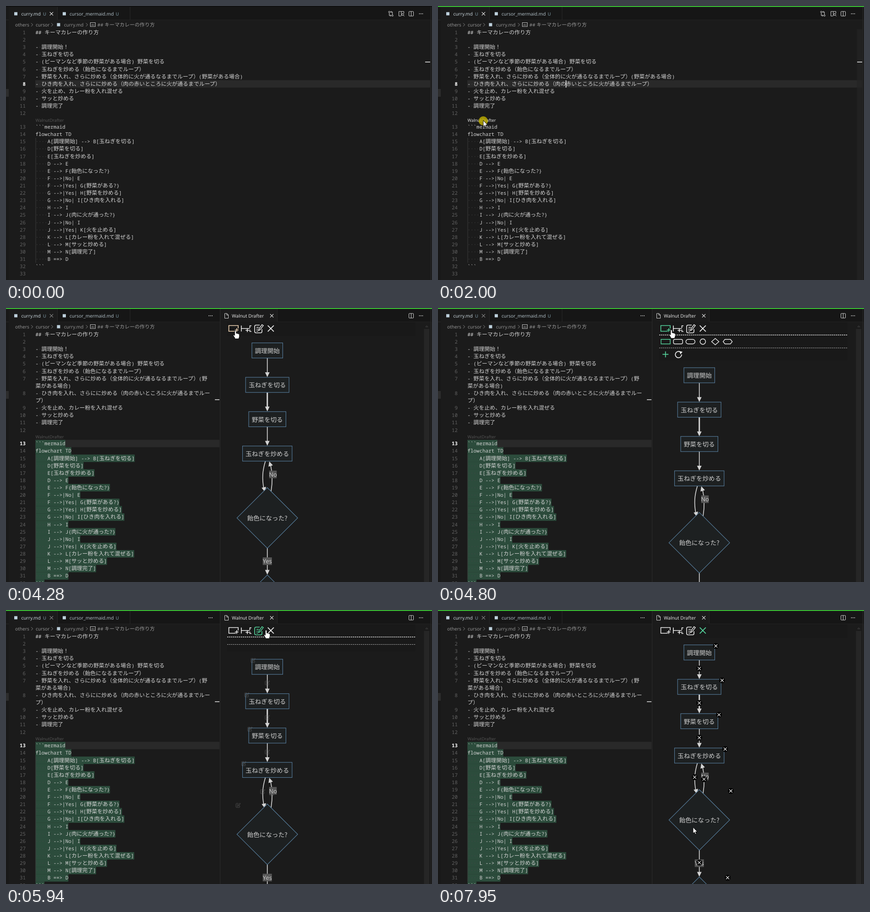
An HTML page for the animation above (8000 ms loop, 932 by 601 pixels).

```html
<!DOCTYPE html>
<html lang="ja">
<head>
<meta charset="utf-8">
<title>Flowchart editing</title>
<style>
html, body { margin: 0; width: 100%; height: 100%; overflow: hidden; background: #1b1b1b; }
svg { display: block; width: 932px; height: 601px; text-rendering: geometricPrecision; }
text { white-space: pre; }
.ui { font-family: "Open Sans", "Noto Sans", "Noto Sans CJK JP", sans-serif; }
.mono { font: 500 10.9px "Noto Sans Mono", monospace; }
.cjk { font: 500 11.9px "Noto Sans CJK JP", sans-serif; }
.dot { fill: #474747; }
.node { font: 13.6px "Noto Sans CJK JP", sans-serif; text-anchor: middle; }
</style>
</head>
<body>
<svg id="stage" viewBox="0 0 932 601"></svg>
<script>
const LOOP = 8000, APP = 'Walnut Drafter', LENS = 'WalnutDrafter';
const BG = '#1b1b1b', BAR = '#161616', EDGE = '#292929', INK = '#d4d4d4';
const GREEN = [86, 214, 158], WHITE = [238, 238, 238], ORANGE = [255, 160, 50];
const LEAD = 16.12, COL = 6.54, WIDE = 11.9, LEFT = 64.5;

// ---- drawing helpers
const rect = (x, y, w, h, fill, more = '') =>
  `<rect x="${x}" y="${y}" width="${w}" height="${h}" fill="${fill}" ${more}/>`;
const path = (d, stroke = INK, w = 1, more = '') =>
  `<path d="${d}" fill="none" stroke="${stroke}" stroke-width="${w}" ${more}/>`;
const circle = (x, y, r, fill, more = '') =>
  `<circle cx="${x}" cy="${y}" r="${r}" fill="${fill}" ${more}/>`;
const label = (x, y, s, size, fill, more = '') =>
  `<text class="ui" x="${x}" y="${y}" font-size="${size}" fill="${fill}" ${more}>${s}</text>`;
const group = (id, body, more = '') => `<g id="${id}" ${more}>${body}</g>`;
const cross = (x, y, r, c, w) =>
  path(`M${x - r} ${y - r}l${2 * r} ${2 * r}m0 ${-2 * r}l${-2 * r} ${2 * r}`, c, w);
const plus = (x, y, r, c, w) => path(`M${x - r} ${y}h${2 * r}M${x} ${y - r}v${2 * r}`, c, w);
const dots = x => [-3.4, 0, 3.4].map(d => circle(x + d, 17, 0.95, INK)).join('');

// ---- document text ("|" marks a soft wrap, "¦" stands for a pipe)
const LINES = `## キーマカレーの作り方

- 調理開始！
- 玉ねぎを切る
- (ピーマンなど季節の野菜がある場合) 野菜を切る
- 玉ねぎを炒める（飴色になるまでループ）
- 野菜を入れ、さらに炒める（全体的に火が通るなるまでループ）(野|菜がある場合)
- ひき肉を入れ、さらにに炒める（肉の赤いところに火が通るまでルー|プ）
- 火を止め、カレー粉を入れ混ぜる
- サッと炒める
- 調理完了

\`\`\`mermaid
flowchart TD
    A[調理開始] --> B[玉ねぎを切る]
    D[野菜を切る]
    E[玉ねぎを炒める]
    D --> E
    E --> F{飴色になった?}
    F -->¦No¦ E
    F -->¦Yes¦ G{野菜がある?}
    G -->¦Yes¦ H[野菜を炒める]
    G -->¦No¦ I[ひき肉を入れる]
    H --> I
    I --> J{肉に火が通った?}
    J -->¦No¦ I
    J -->¦Yes¦ K[火を止める]
    K --> L[カレー粉を入れて混ぜる]
    L --> M[サッと炒める]
    M --> N[調理完了]
    B ==> D
\`\`\`
`.split('\n');

const isAscii = c => c >= ' ' && c <= '~';
const widthOf = s => [...s].reduce((w, c) => w + (isAscii(c) ? COL : WIDE), 0);

function codeRow(s, y) {
  const runs = s.match(/[ -~]+|[^ -~]+/g) || [];
  const spans = runs.map(r => isAscii(r[0])
    ? `<tspan class="mono">${r.replace(/>/g, '&gt;').replace(/ +/g, m =>
        `<tspan class="dot">${'·'.repeat(m.length)}</tspan>`)}</tspan>`
    : `<tspan class="cjk">${r}</tspan>`);
  return `<text x="${LEFT}" y="${y + 4}" fill="${INK}">${spans.join('')}</text>`;
}

function editor(right, active, wrap) {
  let y = 58, back = '', front = '', guide = 0;
  LINES.forEach((line, i) => {
    const n = i + 1, on = n === active;
    if (n === 13) {
      front += label(LEFT, y - 0.4 + 2.9, LENS, 9.4, '#565656', 'data-lens');
      y += 13.6;
    }
    if (n === 15) guide = y - 8;
    front += `<text class="mono" x="43" y="${y + 4}" text-anchor="end" fill="${on ? '#fff' : '#626262'}"
      ${on ? 'style="font-weight:700"' : ''}>${n}</text>`;
    const rows = wrap ? line.split('|') : [line.replace('|', '')];
    rows.map(s => s.replace(/¦/g, '|')).forEach(s => {
      const top = y - 8.06;
      if (on) back += rect(64, top, right - 64, LEAD, '#292929');
      if (wrap && n >= 13) back += rect(LEFT, top, widthOf(s), LEAD + 0.2, '#2c4c3c');
      front += codeRow(s, y);
      y += LEAD;
    });
  });
  return back + path(`M65 ${guide}v${LEAD * 17}`, '#3a3a3a') + front;
}

// ---- window chrome
const fileTabs = (focused) =>
  rect(6, 2, 106, 29, BG) + path('M112.5 2V30M271.5 2V30', EDGE) +
  rect(18, 13.5, 7, 7, '#bdd0dc') + label(33.5, 20.7, 'curry.md', 10.2, '#d2dfe6') +
  label(81, 20.5, 'U', 9.6, '#86a4b1') + cross(99.5, 17, 3.7, focused ? '#e8e8e8' : '#858585', 1.2) +
  rect(124, 13.5, 7, 7, '#bdd0dc') + label(139, 20.7, 'cursor_mermaid.md', 10.2, '#b9c8d0') +
  label(240, 20.5, 'U', 9.6, '#86a4b1');

const chevron = x => path(`M${x - 2} 37.5l3.6 3.6l-3.6 3.6`, '#8c8c8c');
const crumbs = label(20, 44.7, 'others', 10.2, '#9b9b9b') + chevron(57) +
  label(65, 44.7, 'cursor', 10.2, '#9b9b9b') + chevron(101) + rect(111.5, 37.5, 7, 7, '#bdd0dc') +
  label(127, 44.7, 'curry.md', 10.2, '#9b9b9b') + chevron(177) +
  rect(184.5, 36.5, 11, 8.5, 'none', 'stroke="#c4c4c4"') +
  label(186.2, 42.6, 'abc', 4.8, '#c4c4c4') + label(200, 44.7, '##', 10, '#9b9b9b') +
  `<text x="215.5" y="45" fill="#9b9b9b" style="font:11px 'Noto Sans CJK JP',sans-serif">キーマカレーの作り方</text>`;

const splitIcon = rect(881.5, 12, 10, 10, 'none', `stroke="${INK}" rx="1"`) + path('M886.5 12v10');
const tools = splitIcon + dots(908) +
  circle(838.5, 13, 1.6, 'none', `stroke="${INK}"`) + circle(845.5, 21, 1.6, 'none', `stroke="${INK}"`) +
  path('M838.5 15v6h4m-2-2l2 2l-2 2M845.5 19v-6h-4m2-2l-2 2l2 2') +
  path('M864 22h-4.5v-10h11v4M865 12v10') +
  circle(868, 18.5, 2.2, 'none', `stroke="${INK}"`) + path('M869.5 20.5l2 2');

const frameBase = rect(0, 0, 932, 601, BG) + rect(0, 0, 932, 30, BAR) + rect(0, 0, 6, 601, '#181818') +
  rect(0, 182, 6, 17, '#2c2c2c') + path('M6.5 0V601M0 30.5H6M929.5 0V601', EDGE) +
  rect(0, 0, 932, 1.5, '#0d0d0d') + path('M112 30.5H929', '#222');

const single = fileTabs(true) + tools + editor(928, 8, false) +
  group('strip', rect(916.5, 51, 12, 550, '#242424', 'opacity=".7"')) + rect(917, 122, 11, 1.7, '#d8d8d8');

const double = fileTabs(false) + dots(447.5) + editor(467, 13, true) +
  rect(457, 200.4, 10, 1.6, '#d8d8d8') + path('M468.5 2V601', '#2c2c2c') +
  rect(469, 2, 125, 29, BG) + path('M593.5 2V30', EDGE) +
  path('M478.5 12h5l3 3v7.5h-8zM483 12v3.5h3.5', INK) +
  label(494, 20.7, APP, 10.2, '#f0f0f0') + cross(581.5, 17, 3.6, '#e8e8e8', 1.2) + splitIcon + dots(908) +
  rect(914.5, 46, 11.5, 555, '#262626') + path('M918 41.5l2.5-3l2.5 3z', '#3d3d3d');

// ---- flowchart
const MID = 571.7, WIRE = '#d3d3d3', BLUE = '#587f9f';
const boxes = [['調理開始', 76.5, 67.5], ['玉ねぎを切る', 152, 95], ['野菜を切る', 227.3, 81.4], ['玉ねぎを炒める', 302.7, 108.4]];
const boxAt = ([s, y, w]) =>
  rect(MID - w / 2, y, w, 33.2, '#1d2021', `stroke="${BLUE}" stroke-width="1.1"`) +
  `<text class="node" x="${MID}" y="${y + 22.3}" fill="#d0d0d0">${s}</text>`;
const diamond = (cy, r) =>
  `<path d="M${MID} ${cy - r}l${r} ${r}l${-r} ${r}l${-r} ${-r}z" fill="#1d2021" stroke="${BLUE}" stroke-width="1.1"/>`;
const head = (x, y, turn = 0) =>
  `<path d="M0 0l-5-10.5h10z" fill="${WIRE}" transform="translate(${x} ${y}) rotate(${turn})"/>`;
const down = (y1, y2, w = 1.7) => path(`M${MID} ${y1}V${y2 - 8}`, WIRE, w) + head(MID, y2);
const tag = (s, x, y, w) => rect(x - w / 2, y - 8.3, w, 16.6, '#565656') +
  `<text class="node" x="${x}" y="${y + 5}" fill="#d0d0d0" style="font:13px 'Open Sans',sans-serif">${s}</text>`;

const chart = down(110, 151.5) + down(185, 226.8, 3) + down(260.5, 302) +
  path('M567.5 336C561 357 560 374 564 396', WIRE, 1.7) + head(566.3, 403.5, -12) +
  path('M580 402C584 376 582 358 579 345', WIRE, 1.7) + head(576, 336.5, 163) +
  down(527, 585) + boxes.map(boxAt).join('') + diamond(460.5, 66.5) + diamond(645.5, 60) +
  `<text class="node" x="${MID}" y="466" fill="#d0d0d0">飴色になった?</text>` +
  tag('No', 584, 365, 16.5) + tag('Yes', MID, 555.3, 20);

const glow = ([, y, w]) => rect(MID - w / 2 - 3.4, y - 4, w + 6.8, 41, 'none', 'stroke="#f3a84c" stroke-width="3.3"');

const padIcon = c => path('M12 2H4Q1 2 1 5V16Q1 19 4 19H14Q17 19 17 16V11M5 7h5M5 11h3M5 15h3', c, 1.6) +
  path('M9.5 14l1-4L17 1l3 2l-7 9z', c, 1.5);
const badgeAt = (x, y, body) => `<g transform="translate(${x} ${y})">${body}</g>`;
const wireSpots = [[MID, 128.3], [MID, 204], [MID, 280], [561.5, 366.7], [582, 371], [MID, 554]];
const tops = boxes.map(([, y, w]) => [w / 2, y]).concat([[66.5, 394.5], [59.5, 584.7]]);
const spots = side => tops.map(([w, y]) => [MID + side * (w + 2.4), y + 2.4]);

const linkBadges = [112.6, 188, 263, 337, 528.8].map(y => badgeAt(MID, y,
  circle(0, 0, 6.2, '#000') + path('M-4.5-2.5v5M-4.5 0H4M1.5-2.5L4.5 0L1.5 2.5M0-3v6', '#fff', 1.2))).join('');
const editBadges = spots(-1).map(([x, y]) => [x + 5, y]).concat(wireSpots).map(([x, y]) => badgeAt(x, y,
  circle(0, 0, 6, '#000', 'opacity=".5"') + `<g transform="scale(.52) translate(-10 -10)">${padIcon('#fff')}</g>`)).join('');
const dropBadges = spots(1).concat(wireSpots).map(([x, y]) => badgeAt(x, y,
  circle(0, 0, 6.4, '#000') + cross(0, 0, 3.4, '#f2f2f2', 1.2))).join('');

// ---- toolbar
const CUR = 'currentColor';
const icons = [
  path('M503 51H487.5V38.5H508V45', CUR, 1.6) + plus(504.8, 48.3, 4, CUR, 1.6),
  path('M514.8 38.5v13M514.8 45H533M537 39h-3.5v5M537 51.5h-3.5v-4', CUR, 1.6) + plus(528, 49, 3.8, CUR, 1.6),
  `<g transform="translate(543 35.5)">${padIcon(CUR)}</g>`,
  cross(579.3, 45, 6.6, CUR, 1.8)
].map((s, i) => group('icon' + i, s)).join('');

const green = `rgb(${GREEN})`;
const rule = (y, w, c) => path(`M484 ${y}H896`, c, w, 'stroke-dasharray="2.6 1.7"');
const lowerRow = plus(497.7, 101.7, 6.5, green, 1.7) +
  path('M529.5 96.2A6.9 6.9 0 1 0 533 102', '#eee', 1.8) + `<path d="M528 94.5l7 1.5l-4.5 5.5z" fill="#eee"/>`;

function wireSample(i) {
  const x = 488 + 27.15 * i, c = i ? '#eee' : green, end = x + 20, y = 73.7;
  const kind = i % 3, tip = Math.floor(i / 3);
  const tips = [
    `<path d="M${end + 1.5} ${y}l-6.5-4v8z" fill="${c}"/>`, '',
    cross(end - 3, y, 2.6, c, 1.4), circle(end - 1.5, y, 2.8, c)];
  return path(`M${x} ${y}H${end - (tip === 0 ? 4 : 0)}`, c, kind === 2 ? 2.8 : 1.6,
    kind === 1 ? 'stroke-dasharray="2 3.2"' : '') + tips[tip];
}
const wireRow = Array.from({ length: 12 }, (_, i) => wireSample(i)).join('');
const shapeRow = ['M0-5h20V5H0z', 'M3-5H17Q20-5 20-2V2Q20 5 17 5H3Q0 5 0 2V-2Q0-5 3-5z', 'M5-5H15A5 5 0 0 1 15 5H5A5 5 0 0 1 5-5z',
  'M10-6A6 6 0 1 1 9.9-6z', 'M10-7L18 0L10 7L2 0z', 'M4-5H16L20 0L16 5H4L0 0z']
  .map((d, i) => path(d, i ? '#eee' : green, 1.4, `transform="translate(${488 + 27.15 * i} 73.7)"`)).join('');
const panel = (id, h, y2, body) =>
  group(id, rect(484, 60, 412, h, '#191919') + rule(59.3, 1.6, '#f0f0f0') + rule(y2, 1, '#bdbdbd') + body);

// ---- pointer
const shape = (d, w = 0.9) => `<path d="${d}" fill="#fff" stroke="#000" stroke-width="${w}" stroke-linejoin="round"/>`;
const pointer = group('ibeam', path('M-3-8q3 0 3 2q0-2 3-2M0-6V6M-3 8q3 0 3-2q0 2 3 2', '#e8e8e8', 1.1)) +
  group('arrow', shape('M0 0V13.5L3 10.8L5 15.2L7.1 14.3L5.2 10H9.4z')) +
  group('hand', shape('M-1.7 1Q0-1 1.7 1V6.6Q3.2 5.8 4.2 7.2Q5.6 6.4 6.6 8Q8.2 7.4 8.6 9.2V13.5Q8 16.2 6.8 18.6H-.6Q-2 15-4.6 11.6Q-5 9.4-3 10L-1.7 11.4z'));

const stage = document.getElementById('stage');
stage.innerHTML = frameBase + rect(6, 31, 923, 570, BG) +
  group('single', single) + group('double', double) + crumbs +
  group('caret', rect(279.3, 163, 1.6, 16, '#eee')) +
  group('web', rect(484, 31, 412, 30, '#191919') +
    group('chart', chart + group('glow0', glow(boxes[0])) + group('glow1', glow(boxes[1])) +
      group('links', linkBadges) + group('edits', editBadges) + group('drops', dropBadges)) +
    panel('panel0', 55, 87.6, shapeRow + lowerRow) + panel('panel1', 55, 87.6, wireRow + lowerRow) +
    panel('panel2', 31, 75.6, '') + icons) +
  group('rim', rect(0, 0, 932, 2, '#3cc535')) +
  circle(99, 252, 10, '#c2b200', 'id="halo" opacity=".8"') + group('pointer', pointer);

const el = id => document.getElementById(id);
const lens = stage.querySelector('#single [data-lens]');
const show = (id, on) => el(id).style.display = on ? '' : 'none';

// ---- time
const BURSTS = [[120, 860, 12], [930, 1730, 12], [1930, 2070, 3], [2270, 2670, 7], [2870, 3000, 3],
  [3140, 3540, 7], [3870, 4670, 13], [4730, 5470, 12], [5540, 6340, 13], [6410, 7210, 12], [7280, 7950, 10]];
const TRACK = [[120, 924, 492], [400, 700, 330], [700, 300, 120], [860, 180, 70], [1000, 199, 60],
  [1130, 182, 90], [1500, 112, 225], [1730, 99, 251], [2270, 99, 251], [2470, 330, 215],
  [2670, 525, 162], [2870, 540, 161], [3000, 614, 158], [3140, 620, 160], [3270, 640, 176],
  [3400, 630, 120], [3540, 590, 86], [3870, 580, 82], [4200, 502, 49], [4670, 502, 49],
  [5100, 531, 45], [5470, 531, 45], [5700, 552, 45], [5800, 556, 45], [5940, 569, 44],
  [6150, 578, 43], [6410, 578, 43], [6700, 577, 80], [7210, 571, 241], [7940, 558, 476.5]];
const POINTERS = [[0, 'ibeam'], [1550, 'arrow'], [2600, 'hand'], [3200, 'arrow'], [3450, 'hand'],
  [3910, 'arrow'], [4130, 'hand'], [6480, 'arrow']];
const HOVER = [4150, 4950, 5600, 6000], CLICK = [4410, 5100, 5700, 6300], SHIFT = [54.4, 54.4, 31.5, 0];

// the screen advances in short bursts of even steps
function snap(t) {
  const b = BURSTS.filter(s => s[0] <= t).pop();
  if (!b) return 0;
  const step = (b[1] - b[0]) / (b[2] - 1);
  return b[0] + Math.floor((Math.min(t, b[1]) - b[0]) / step + 0.01) * step;
}
const clamp = v => Math.max(0, Math.min(1, v));
const mix = (a, b, k) => a.map((v, i) => Math.round(v + (b[i] - v) * k));

function place(t) {
  const i = TRACK.findIndex(k => k[0] > t);
  if (i < 0) return TRACK[TRACK.length - 1].slice(1);
  if (!i) return TRACK[0].slice(1);
  const [a, b] = [TRACK[i - 1], TRACK[i]], k = (t - a[0]) / (b[0] - a[0]);
  return [a[1] + (b[1] - a[1]) * k, a[2] + (b[2] - a[2]) * k];
}

function draw(now) {
  const t = snap(now + 0.5), split = t >= 2069, mode = CLICK.filter(c => c <= t).length - 1;
  show('single', !split);
  show('double', split);
  show('strip', t >= 500);
  show('caret', t >= 1930 && !split);
  show('rim', t >= 1930);
  show('halo', t >= 1930 && !split);
  lens.setAttribute('fill', t >= 1600 ? '#f0f0f0' : '#565656');

  show('web', t >= 2330);
  el('chart').setAttribute('transform', `translate(0 ${mode < 0 ? 0 : SHIFT[mode]})`);
  show('glow0', t >= 3450 && t < 3910);
  show('glow1', t >= 2600 && t < 3200);
  for (let i = 0; i < 4; i++) {
    if (i < 3) show('panel' + i, mode === i);
    const warm = t >= HOVER[i] && t < CLICK[i] ? clamp((t - HOVER[i]) / 400) : 0;
    el('icon' + i).style.color = `rgb(${mode === i ? GREEN : mix(WHITE, ORANGE, warm)})`;
  }
  const fade = from => clamp((t - from) / 800);
  el('links').style.opacity = mode === 1 ? fade(CLICK[1]) : 0;
  el('edits').style.opacity = mode === 2 ? fade(CLICK[2]) : mode === 3 ? 0.75 * (1 - fade(CLICK[3])) : 0;
  el('drops').style.opacity = mode === 3 ? fade(CLICK[3]) : 0;

  const kind = POINTERS.filter(p => p[0] <= t).pop()[1];
  ['ibeam', 'arrow', 'hand'].forEach(k => show(k, k === kind));
  show('pointer', t >= 120);
  el('pointer').setAttribute('transform', `translate(${place(t).join(' ')})`);
}

const start = performance.now();
function tick() {
  draw((performance.now() - start) % LOOP);
  requestAnimationFrame(tick);
}
tick();
</script>
</body>
</html>
```
